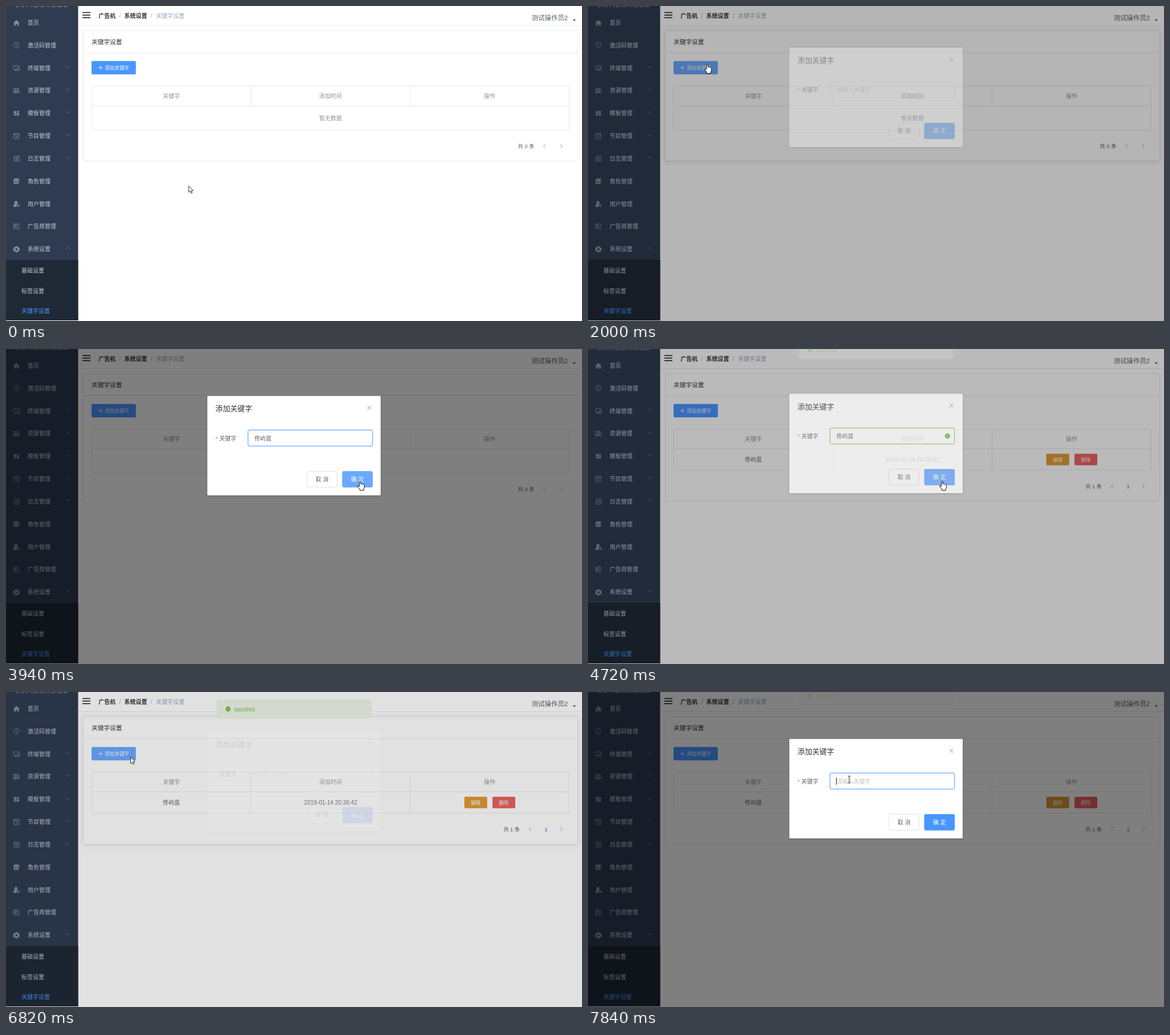
Recreate the animation shown at these times as an HTML page. Size 1010 px wide and 554 px high, loop 8000 ms.

```html
<!DOCTYPE html>
<html>
<head>
<meta charset="utf-8">
<title>关键字设置</title>
<style>
html, body { margin: 0; width: 100%; height: 100%; overflow: hidden; background: #fff; }
svg { display: block; position: absolute; left: 0; top: 0; }
text { font-family: "Liberation Sans", "Noto Sans CJK SC", "Noto Sans CJK", sans-serif; white-space: pre; }
.line { fill: none; stroke: #e6e8ec; }
.icon { stroke: #858c96; fill: none; stroke-width: .9; }
.icon.solid { fill: #858c96; stroke: none; fill-rule: evenodd; }
.chev { fill: none; stroke: #8b929d; stroke-width: .9; }
.lifted { filter: drop-shadow(0 1px 4px rgba(0,0,0,.13)); }
#box { filter: drop-shadow(0 1px 1.5px rgba(0,0,0,.3)); }
</style>
</head>
<body>
<svg id="stage" width="1010" height="554" viewBox="0 0 1010 554"></svg>
<script>
const LOOP = 8000;
const BLUE = '#4896ff', LIGHT = '#6ba9ff', DARK = '#3f87e6', GREEN = '#6fbb40';
const KEYWORD = '佟屿蓝';

// Text placed by its vertical centre.
const text = (x, mid, s, size = 10, fill = '#606266', extra = '') =>
  `<text x="${x}" y="${mid + size * .38}" font-size="${size}" fill="${fill}" ${extra}>${s}</text>`;
const centred = (x, mid, s, size, fill, extra = '') =>
  text(x, mid, s, size, fill, 'text-anchor="middle" ' + extra);
const rect = (x, y, w, h, fill, extra = '') =>
  `<rect x="${x}" y="${y}" width="${w}" height="${h}" fill="${fill}" ${extra}/>`;
const path = (d, cls = 'line', extra = '') => `<path d="${d}" class="${cls}" ${extra}/>`;
const chevron = (x, y, dir) =>
  path(`M${x - dir * 1.8} ${y - 3.4}l${dir * 3.6} 3.4l${-dir * 3.6} 3.4`, 'chev');
const tick = (x, y, r) =>
  `<circle cx="${x}" cy="${y}" r="${r}" fill="${GREEN}"/>` +
  path(`M${x - 2} ${y}l1.5 1.5l2.6-2.8`, '', 'fill="none" stroke="#fff" stroke-width="1"');

// Sidebar entries: label, icon path, solid icon, arrow direction (1 down, -1 up).
const menu = [
  ['首页', 'M-5.6.6L0-5 5.6.6H4.2V5H1.2V2H-1.2V5H-4.2V.6Z', 1, 0],
  ['激活码管理', 'M0-5L4-3.6V0C4 2.5 2 4.2 0 5C-2 4.2-4 2.5-4 0V-3.6ZM0-2.6V-1.5M0-.4V2.6', 0, 0],
  ['终端管理', 'M1.5 2.2H-5V-4H4V-1M-3 4.3H.5M-1.2 2.2V4.3M2-.8H5.2V4.4H2Z', 0, 1],
  ['资源管理', 'M-5-4H-2V4H-5ZM-2-4H1V4H-2ZM1.2-3.6L3.4-4.2 5.4 3.5 3 4ZM-5 2H1', 0, 1],
  ['模板管理', 'M-4.5-4H-.5V.6H-4.5ZM.5-4H4.5V-1.2H.5ZM-4.5 1.5H-.5V4H-4.5ZM.5-.3H4.5V4H.5Z', 1, 1],
  ['节目管理', 'M-4.6-4.5H4.6V4.5H-4.6ZM-4.6-2.2H4.6M-1.6 1.2H1.6M0-.4V2.8', 0, 1],
  ['日志管理', 'M-3.6-4.6H4.6V4.6H-3.6ZM-1.6-2.2H2.8M-1.6 0H2.8M-1.6 2.2H2.8M-5-2.5H-3.6M-5 0H-3.6M-5 2.5H-3.6', 0, 1],
  ['角色管理', 'M-4.8-4H3V4.6H-4.8ZM-3-5H4.8V3.6H3.8V-4.2H-3ZM-1-2L-3 3H-2L-1 .5L0 3H1.2Z', 1, 0],
  ['用户管理', 'M-.8-5.5A2.8 2.8 0 0 1 1-.5L2 .4A3 3 0 0 0 1 5H-5.5C-5.5 2-4.5.4-2.6-.5A2.8 2.8 0 0 1-.8-5.5ZM3.6.8A2.1 2.1 0 1 1 3.5.8ZM3.6 2A.9.9 0 1 0 3.7 2Z', 1, 0],
  ['广告商管理', 'M0 3.6H-4.8V-4.8H3.6V-.5M-3-2.6H-.4V-.2H-3ZM1-2.4H2.4M-3 1.6H0M3 .8A2.1 2.1 0 1 1 2.9.8', 0, 0],
  ['系统设置', 'M-1.6-5.3H1.6L2.3-3.6 4.6-3.5 5.8-.9 4.6 0 5.8.9 4.6 3.5 2.3 3.6 1.6 5.3H-1.6L-2.3 3.6-4.6 3.5-5.8.9-4.6 0-5.8-.9-4.6-3.5-2.3-3.6ZM-2 0A2 2 0 1 0 2 0A2 2 0 1 0-2 0Z', 1, -1]
];

const sidebar = () => rect(0, 0, 126.5, 553, '#2f3b50') + rect(0, 446.5, 126.5, 106.5, '#1f2935') +
  text(17, -2.8, '多屏内容发布管理端', 10.1, '#a3adba') +
  menu.map(([label, d, solid, dir], i) => {
    const y = 29 + i * 39.85;
    return path(d, solid ? 'icon solid' : 'icon', `transform="translate(18.3 ${y + .4})"`) +
      text(38, y, label, 10, '#c3cdd9') +
      (dir ? path(`M104.6 ${y - 1.6 - dir * 1.7}l3.5 ${dir * 3.4}l3.5 ${-dir * 3.4}`, 'chev', 'opacity=".75"') : '');
  }).join('') +
  ['基础设置', '标签设置', '关键字设置'].map((s, i) =>
    text(27, 465 + i * 35.7, s, 10, i == 2 ? BLUE : '#c3cdd9')).join('');

const header = () => path('M126.5 34.5H1010') +
  path('M134 11.5H148M134 16H148M134 20.5H148', '', 'stroke="#111" stroke-width="1.7"') +
  text(162.3, 17, '广告机', 10, '#303133', 'font-weight="700"') + text(198.4, 17, '/', 10, '#a9adb5') +
  text(207.6, 17, '系统设置', 10, '#303133', 'font-weight="700"') + text(253.7, 17, '/', 10, '#a9adb5') +
  text(263, 17, '关键字设置', 10, '#97a8be') +
  text(921.7, 21, '测试操作员2', 11.43, '#5a5e66') +
  '<path d="M993.8 23.6h5.4l-2.7 3z" fill="#4a4d54"/>';

const table = () => `<rect id="card" x="135.5" y="43.5" width="867" height="229" rx="2.5" fill="#fff" stroke="#e6e8ec"/>` +
  path('M135.5 82H1002.5') + text(150, 63, '关键字设置', 10.71, '#303133') +
  rect(150, 96.7, 77.7, 23.6, BLUE, 'id="add" rx="2"') +
  path('M162.2 108.4H169.4M165.8 104.8V112', '', 'stroke="#fff" stroke-width=".9"') +
  text(173.2, 108.4, '添加关键字', 8.57, '#fff', 'font-weight="500"') +
  rect(150.5, 175.5, 837, 37.5, '#f5f7fa', 'id="glow"') +
  `<path id="grid" class="line"/>` +
  ['关键字', '添加时间', '操作'].map((s, i) => centred(290 + i * 279, 158, s, 10, '#909399')).join('') +
  '<g id="empty">' + centred(569, 197, '暂无数据', 10, '#909399') +
  text(897.6, 246, '共 0 条', 9.29) + chevron(944, 246.3, -1) + chevron(974, 246.3, 1) + '</g>' +
  '<g id="row">' + centred(290, 193.7, KEYWORD) + centred(569.3, 193.7, '2019-01-14 20:26:42') +
  rect(803.7, 184.2, 40, 20.2, '#de9a35', 'rx="2"') + centred(823.5, 194.5, '编辑', 8.57, '#fff', 'font-weight="500"') +
  rect(853, 184.2, 40, 20.2, '#ea6161', 'rx="2"') + centred(872.8, 194.5, '删除', 8.57, '#fff', 'font-weight="500"') +
  text(872.2, 241, '共 1 条', 9.29) + chevron(919, 241.3, -1) + chevron(974, 241.3, 1) +
  centred(947, 241, '1', 9.29, BLUE, 'font-weight="700"') + '</g>';

const dialog = () => '<g id="dialog">' + rect(353, 82.5, 304, 175, '#fff', 'id="box" rx="1.4"') +
  text(367.3, 104.6, '添加关键字', 12.86, '#303133') +
  path('M633.6 99.8l7 7M640.6 99.8l-7 7', '', 'stroke="#909399" stroke-width="1"') +
  text(367.3, 158, '*', 10, '#f56c6c') + text(374, 156.7, '关键字') +
  rect(424.3, 142.5, 218.4, 28.2, '#fff', 'id="input" rx="2.8" stroke="#dcdfe6"') +
  '<g id="hint">' + text(435.5, 156.7, '请输入关键字', 10, '#c0c4cc') + '</g>' +
  '<g id="value">' + text(435.5, 156.7, KEYWORD) + '</g>' +
  '<g id="valid">' + tick(630.2, 156.8, 4.6) + '</g>' +
  '<path id="caret" stroke="#222" stroke-width="1"/>' +
  rect(528, 215, 52.3, 28, '#fff', 'rx="2.8" stroke="#dcdfe6"') + centred(554.2, 229, '取 消', 10, '#606266', 'font-weight="500"') +
  rect(589.5, 214.7, 53.6, 28.7, BLUE, 'id="ok" rx="2.8"') + centred(616.3, 229, '确 定', 10, '#fff', 'font-weight="500"') + '</g>';

const message = () => '<g id="msg">' + rect(370, 13.7, 270, 32.3, '#eef7e8', 'rx="2.8" stroke="#e1f3d8" stroke-width=".8"') +
  tick(389.4, 30, 4.4) + text(400, 30, 'success', 10.1, GREEN) + '</g>';

const pointer = () => '<g id="pointer">' +
  '<path id="arrow" d="M.4.4V11.8L3 9.4 4.9 13.3 6.6 12.5 4.8 8.7H8.3Z" fill="#fff" stroke="#222" stroke-width=".9"/>' +
  '<path id="hand" d="M-1.2 9.5V1.2Q0-.3 1.2 1.2V5.4Q2.6 4.5 3.4 5.8Q4.8 5 5.5 6.3Q7 5.9 7.3 7.4V11Q7.2 13 6.2 14.2V16.6H-.6V14.6L-4.4 9.9Q-4.8 8.2-3 8.4Z" fill="#fff" stroke="#111" stroke-width="1"/>' +
  '<path id="beam" d="M-2.5-6H-.6L0-5.4.6-6H2.5M0-5.4V5.4M-2.5 6H-.6L0 5.4.6 6H2.5" fill="none" stroke="#222" stroke-width="1"/></g>';

const stage = document.getElementById('stage');
stage.innerHTML = rect(0, 0, 1010, 554, '#fff') + table() + header() + sidebar() +
  rect(0, 0, 1010, 554, '#000', 'id="shade"') + dialog() + message() + pointer();
const el = {};
stage.querySelectorAll('[id]').forEach(n => el[n.id] = n);

const show = (n, on) => n.style.display = on ? '' : 'none';
const set = (n, attrs) => { for (const k in attrs) n.setAttribute(k, attrs[k]); };

const bursts = [
  [450, 600, 3], [910, 1680, 11], [1760, 2550, 11], [2620, 2860, 4], [3020, 3020, 1], [3250, 3790, 8],
  [3940, 3940, 1], [4320, 4560, 4], [4720, 5120, 6], [5430, 6120, 10], [6670, 6670, 1], [6820, 7600, 11], [7690, 7840, 3]
];
function snap(t) {
  const b = bursts.filter(s => s[0] <= t).pop();
  if (!b) return 0;
  const gap = (b[1] - b[0]) / (b[2] - 1) || 1;
  return b[0] + gap * Math.min(b[2] - 1, Math.floor((t - b[0]) / gap + .001));
}

// Pointer track: time, x, y.
const track = [
  [0, 320, 316], [375, 320, 316], [600, 291, 301], [840, 291, 301], [1680, 209, 102], [2010, 209, 102],
  [2550, 501, 175], [2620, 504, 186], [2860, 502, 200], [3019, 502, 200], [3020, 470, 156], [3180, 470, 156],
  [3790, 618, 230], [3860, 618, 230], [3940, 621, 232], [4730, 621, 232], [5120, 600, 205], [5350, 600, 205],
  [5430, 564, 214], [6120, 219, 106], [6760, 219, 106], [6820, 218, 114], [7600, 475, 196], [7620, 475, 196],
  [7840, 458, 154], [LOOP, 458, 154]
];
function pointerAt(t) {
  const i = track.findIndex(k => k[0] > t), a = track[i - 1], b = track[i];
  let p = (t - a[0]) / (b[0] - a[0]);
  p = p * p * (3 - 2 * p);
  return [a[1] + (b[1] - a[1]) * p, a[2] + (b[2] - a[2]) * p];
}

// CSS "ease" curve.
function ease(x) {
  if (x <= 0) return 0;
  if (x >= 1) return 1;
  let lo = 0, hi = 1, u;
  for (let i = 0; i < 24; i++) {
    u = (lo + hi) / 2;
    if (3 * u * (1 - u) * (1 - u) * .25 + 3 * u * u * (1 - u) * .25 + u * u * u < x) lo = u; else hi = u;
  }
  return 3 * u * (1 - u) * (1 - u) * .1 + 3 * u * u * (1 - u) + u * u * u;
}
const fade = (t, open, close, dur) => ease((t - open) / dur) - ease((t - close) / dur);
const modal = (t, dur) => fade(t, 1930, 4665, dur) + fade(t, 6785, 1e5, dur);

function render(now) {
  const t = snap(now), within = (a, b) => t >= a && t < b;
  const [x, y] = pointerAt(t);
  const over = (l, top, r, b) => x >= l && x <= r && y >= top && y <= b;
  const filled = t >= 4700;
  const free = t < 2060 || within(4860, 6860);

  // page
  const onAdd = over(150, 97, 228, 120) && (t < 2060 || within(5400, 6800));
  const pressed = within(1760, 1910) || within(6670, 6800);
  const addFocus = within(1910, 3000) || within(6800, 7760);
  el.add.setAttribute('fill', pressed ? DARK : onAdd || addFocus ? LIGHT : BLUE);
  const bottom = filled ? 213 : 218;
  set(el.grid, { d: `M150.5 141H987.5V${bottom}H150.5ZM150.5 175.5H987.5M429.5 141V${filled ? 213 : 175.5}M708.5 141V${filled ? 213 : 175.5}` });
  el.card.setAttribute('height', filled ? 224 : 229);
  el.card.classList.toggle('lifted', free && over(135, 43, 1002, filled ? 267 : 272));
  show(el.glow, filled && free && over(150, 175, 988, 213));
  show(el.empty, !filled);
  show(el.row, filled);

  // dialog
  const a = modal(t, 300);
  el.shade.setAttribute('opacity', .5 * modal(t, 200));
  show(el.dialog, a > 0);
  set(el.dialog, { opacity: a, transform: `translate(0 ${-14.3 * (1 - a)})` });
  const typed = within(3020, 6000), valid = within(4320, 6000);
  const focus = within(3020, 4320) || t >= 7760;
  show(el.hint, !typed);
  show(el.value, typed);
  show(el.valid, valid);
  el.input.setAttribute('stroke', valid ? GREEN : focus ? BLUE : '#dcdfe6');
  show(el.caret, focus && (t > 7000 || Math.floor((t - 3020) / 500) % 2 == 0));
  el.caret.setAttribute('d', `M${typed ? 466.5 : 435.5} 150.5v12.5`);
  const onOk = within(3000, 4800) && over(589, 215, 643, 244);
  el.ok.setAttribute('fill', onOk ? LIGHT : BLUE);

  // message: the second dialog opens above it
  const slide = fade(t, 4673, 7675, 400);
  show(el.msg, slide > 0);
  set(el.msg, { opacity: fade(t, 4673, 7675, 300), transform: `translate(0 ${-33 * (1 - slide)})` });
  stage.insertBefore(el.msg, t > 6700 ? el.shade : el.pointer);

  // pointer
  const beam = a > .5 && over(424, 142, 643, 171) && t < 4700 || t > 7700 && over(424, 142, 643, 171);
  const hand = !beam && (onAdd || onOk);
  el.pointer.setAttribute('transform', `translate(${x} ${y})`);
  show(el.beam, beam);
  show(el.hand, hand);
  show(el.arrow, !beam && !hand);
}

const start = performance.now();
function tickFrame() {
  render((performance.now() - start) % LOOP);
  requestAnimationFrame(tickFrame);
}
tickFrame();
</script>
</body>
</html>
```
